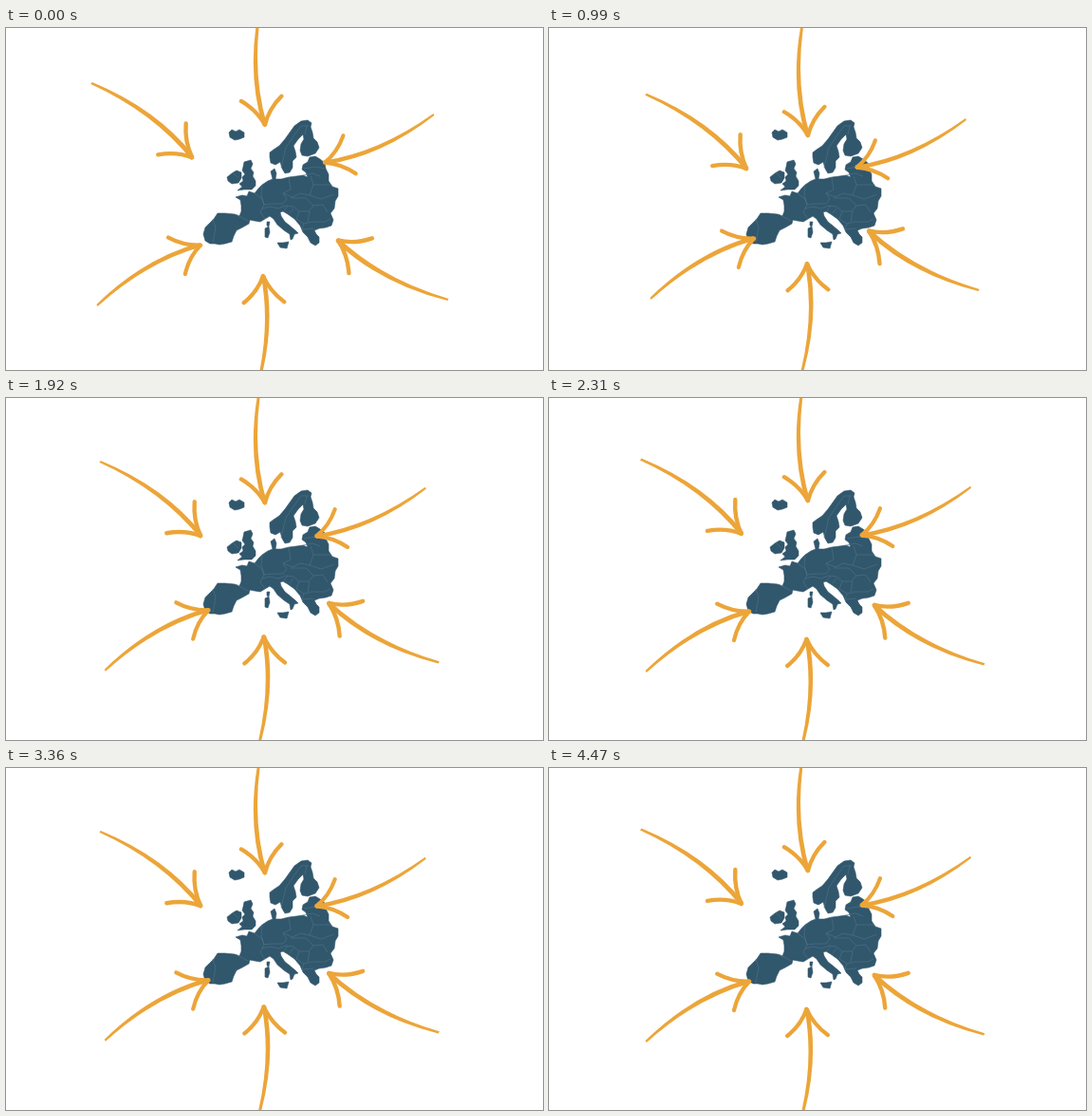
Animation of 566 by 360 pixels, one loop 4500 ms. Source, as an HTML page:

```html
<!DOCTYPE html>
<html lang="en">
<head>
<meta charset="utf-8">
<title>Arrows to Europe</title>
<style>
  html, body { margin: 0; width: 100%; height: 100%; overflow: hidden; background: #fff; }
  svg { display: block; width: 566px; height: 360px; }
  .land { fill: #31576d; stroke: #31576d; stroke-width: .6; stroke-linejoin: round; }
  .borders { fill: none; stroke: #517488; stroke-width: .6; stroke-linejoin: round; }
  .shaft { fill: #eca539; }
  .head { fill: none; stroke: #eca539; stroke-width: 4.3; stroke-linecap: round; stroke-linejoin: round; }
</style>
</head>
<body>
<svg viewBox="0 0 566 360">
  <defs>
    <g id="arrow">
      <path class="shaft" d="M-130-1.2Q-60-18.8 0-2.4L0 2.4Q-60-13.6-130 1.2Z"/>
      <path class="head" d="M-27-24.5Q-17-8.5-1 0Q-18 4.5-31 18.5"/>
    </g>
  </defs>
  <g class="land">
    <path d="M235 110l3-3 4 2 4-2 5 3v5l-5 2-5 1-5-3z"/>
    <path d="M251 141l7-2 2 4-2 5 3 4-1 4 3 5v5l-4 4-8 0-7 1 5-4-3-3 4-3-1-4 3-3-3-4 1-4z"/>
    <path d="M234 161l-1-4 5-4 5-3 5 2v6l-3 5-7 1z"/>
    <path d="M278 131l4-3 6-4 6-7 5-7 5-7 7-5 7-1 4 3-1 4 2 6 1 6 4 4 2 6-4 6-8 3-6-1-2-5 1-7 3-5-1-5-5 5-5 7 2 6 1 6-4 4 0 7-3 5-5 1-3-5-2-7-5 3-5-2-1-6z"/>
    <path d="M279 151l4-3 2 5-1 6 6 0 8-2 8-1 7-1 5 2-2-5-4-3 1-5 5-3 2-5 6-1 5 3 5 4 1 6 3 6v7l4 6 6 2v8l-3 5-1 8-4 5 3 7-2 6-6 2-7 1-5 2 2 4 3 3v6l-4 3-5-3-3-6-5-5-3-7-6-7-7-5-5-3-3 1 1 4 4 6 5 4 6 5 3 3-4 1-2 5-2 1-1-6-6-4-7-6-4-6-4-3-5 3-5 3-6-1-5-1-1 4-7 4-6 3-3 6-2 6-7 2-6 1-5-1-5 0-5-3-2-7 2-7 3-3 6-6 4-6 8 0 10 1 5 2 2-5v-6l-1-6-5-3 7-2 5 1 2-5 6 2 4-5 4-4 6-4 5-2-1-4z"/>
    <path d="M286 226l6 0 6-1-2 7-7-1z"/>
    <path d="M273 211l4-2 1 6-2 6-3-1z"/>
    <path d="M275 204l3 0-1 5-2-1z"/>
  </g>
  <path class="borders" d="M290 147l2-9 3-12 8-12 8-11 8 0M317 103l-2 9M218 201l3 9-3 16M242 196l13 7M262 174l8 6 2 6-4 8 5 7M270 165l-1 11 3 10 9-1 11 0 4-5-4-6 8-4-2-13M292 174l10 4 8-4 10 2 4-11-3-9M270 190l8-2 9 2 8-3 8 1 6 5 10 0 5-6-8-8-16 0M297 187l-4 5M303 190l-4 5M309 193l-3 8 8 5 8-2 14 0 6-3M320 193l-2 11M324 187l10-1 5 8M320 176l12 4 14-5M324 165l18 0M314 148l12-2 10 2M313 155l10-2 8 3M314 206l-2 6 12-1M254 140l-1 1M240 153l5 5"/>
  <g id="arrows"></g>
</svg>
<script>
  // tail, tip, travel per unit, side the shaft bends to
  const arrows = [
    { tail: [90, 58],   tip: [197, 137], move: [.96, .94],   side: 1 },
    { tail: [269, -26], tip: [273, 103], move: [0, .9],      side: -1 },
    { tail: [451, 91],  tip: [335, 142], move: [-.92, .4],   side: 1 },
    { tail: [466, 286], tip: [349, 223], move: [-1.03, -.8], side: 1 },
    { tail: [262, 388], tip: [271, 260], move: [.08, -1.04], side: -1 },
    { tail: [96, 292],  tip: [206, 228], move: [.88, -.56],  side: 1 }
  ];
  const FRAME = 30, FRAMES = 150, PERIOD = 24, SPEED = 1.39, LEAD = .6;
  const layer = document.getElementById('arrows');

  for (const a of arrows) {
    const dx = a.tip[0] - a.tail[0], dy = a.tip[1] - a.tail[1];
    const angle = Math.atan2(dy, dx) * 180 / Math.PI;
    const scale = Math.hypot(dx, dy) / 130;
    a.pose = `rotate(${angle}) scale(${scale} ${scale * a.side})`;
    a.node = document.createElementNS('http://www.w3.org/2000/svg', 'use');
    a.node.setAttribute('href', '#arrow');
    layer.append(a.node);
  }

  // Steady push in and back out
  function travel(frame) {
    const half = PERIOD / 2;
    return SPEED * (half - Math.abs((frame + LEAD) % PERIOD - half) - LEAD);
  }

  function draw(now) {
    const d = travel(Math.floor(now / FRAME) % FRAMES);
    for (const { node, tip, move, pose } of arrows)
      node.setAttribute('transform',
        `translate(${tip[0] + move[0] * d} ${tip[1] + move[1] * d}) ${pose}`);
  }

  const start = performance.now();
  function tick() {
    draw(performance.now() - start);
    requestAnimationFrame(tick);
  }
  tick();
</script>
</body>
</html>
```
